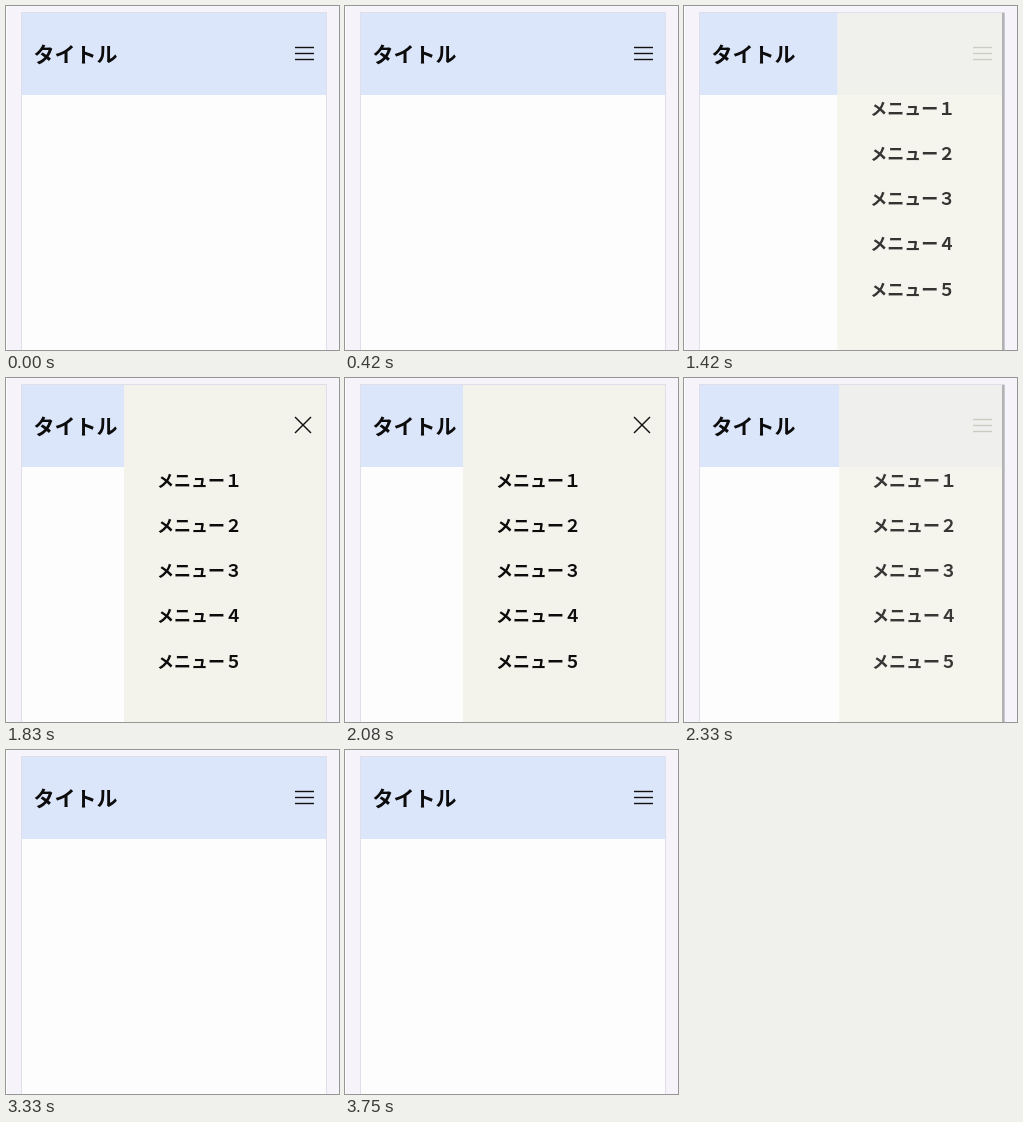
Animation of 333x344 px, one loop 3.83 s. Source, as an HTML page with a canvas:

```html
<!DOCTYPE html>
<html lang="ja">
<head>
<meta charset="utf-8">
<style>
html, body { margin: 0; width: 333px; height: 344px; overflow: hidden; }
canvas { display: block; }
</style>
</head>
<body>
<canvas id="stage" width="333" height="344"></canvas>
<script>
const ctx = document.getElementById('stage').getContext('2d');
const LOOP = 3830, STEP = 1000 / 12;
const OPEN_AT = 1154, CLOSE_AT = 2259, DURATION = 500, SCROLLBAR_UNTIL = 3080;
const PANEL_X = 118, PANEL_WIDTH = 203;

// CSS "ease": cubic-bezier(.25, .1, .25, 1)
function ease(u) {
  if (u <= 0) return 0;
  if (u >= 1) return 1;
  let lo = 0, hi = 1, s;
  for (let i = 0; i < 24; i++) {
    s = (lo + hi) / 2;
    if (0.75 * s * (1 - s) + s ** 3 < u) lo = s; else hi = s;
  }
  return 0.3 * s * (1 - s) ** 2 + 3 * s * s * (1 - s) + s ** 3;
}

function rect(color, x, y, w, h) {
  ctx.fillStyle = color;
  ctx.fillRect(x, y, w, h);
}

function text(string, x, y, size) {
  ctx.font = `bold ${size}px "Noto Sans CJK JP", "Noto Sans CJK", sans-serif`;
  ctx.fillStyle = '#0c0c0c';
  ctx.fillText(string, x, y);
}

function line(x1, y1, x2, y2) {
  ctx.beginPath();
  ctx.moveTo(x1, y1);
  ctx.lineTo(x2, y2);
  ctx.stroke();
}

function drawPage() {
  rect('#f6f4fa', 0, 0, 333, 344);
  rect('#fff', 0, 0, 1, 344);
  rect('#dfdfec', 15, 6, 306, 338);
  rect('#fdfdfd', 16, 7, 304, 337);
  rect('#dce6fb', 16, 7, 304, 82);
  text('タイトル', 27.5, 56, 21);
  ctx.lineWidth = 1.4;
  for (const y of [41.5, 47.5, 53.5]) line(289, y, 308, y);
}

function drawPanel(open) {
  ctx.save();
  ctx.beginPath();
  ctx.rect(16, 7, 304, 337);
  ctx.clip();
  ctx.globalAlpha = open;
  ctx.translate(PANEL_X + (1 - open) * PANEL_WIDTH, 0);
  rect('#f4f3eb', 0, 7, PANEL_WIDTH, 337);
  [...'１２３４５'].forEach((digit, i) => text('メニュー' + digit, 33, 108.5 + 45.25 * i, 17));
  line(171, 39, 187, 55);
  line(187, 39, 171, 55);
  ctx.restore();
}

function draw(time) {
  const t = Math.floor((time % LOOP + 5) / STEP) * STEP;
  const open = ease((t - OPEN_AT) / DURATION) - ease((t - CLOSE_AT) / DURATION);
  const scrollbar = (t > OPEN_AT && t < OPEN_AT + DURATION) || (t > CLOSE_AT && t < SCROLLBAR_UNTIL);
  ctx.strokeStyle = '#111';
  drawPage();
  if (open > 0) drawPanel(open);
  if (scrollbar) rect('#b2b2b4', 318, 7, 2.5, 337);
}

const start = performance.now();
function tick() {
  draw(performance.now() - start);
  requestAnimationFrame(tick);
}
tick();
</script>
</body>
</html>
```
